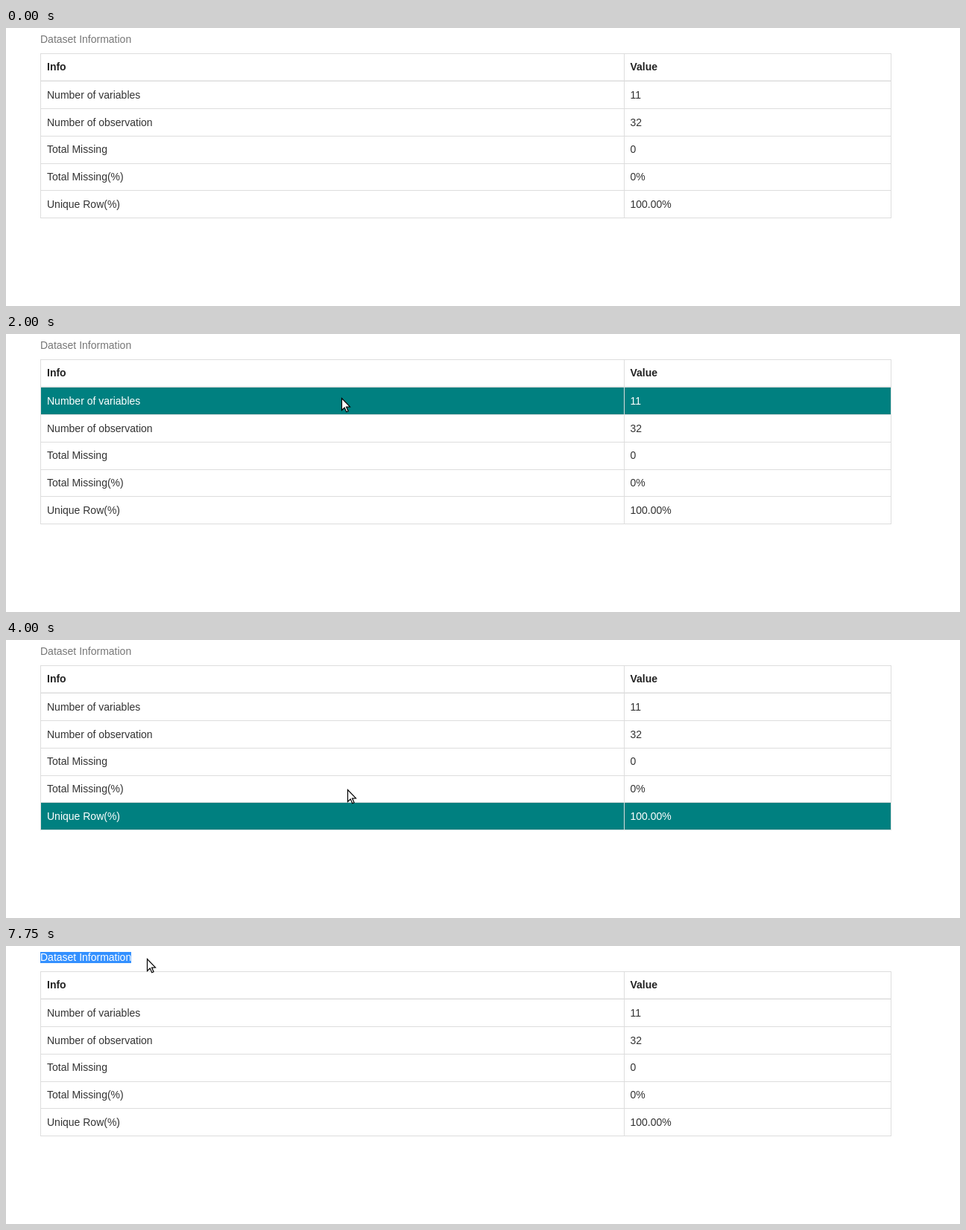
Recreate the animation shown at these times as an HTML page with a canvas. Size 1280 by 374 pixels, loop 8 s.

```html
<!DOCTYPE html>
<html lang="en">
<head>
<meta charset="utf-8">
<title>Dataset Information</title>
<style>
  html, body { margin: 0; width: 100%; height: 100%; overflow: hidden; background: #fff; }
  canvas { display: block; }
</style>
</head>
<body>
<canvas id="stage" width="1280" height="374"></canvas>
<script>
const ctx = document.getElementById('stage').getContext('2d');
const LOOP = 8000, STEP = 250;
const LEFT = 46, SPLIT = 829, RIGHT = 1187;
const LINES = [71, 108, 145, 182, 218, 255];
const BASELINES = [95, 132, 168, 205, 242];
const TITLE = 'Dataset Information';
const FONT = '14px "Liberation Sans", Arial, sans-serif';
const ROWS = [
  ['Number of variables', '11'],
  ['Number of observation', '32'],
  ['Total Missing', '0'],
  ['Total Missing(%)', '0%'],
  ['Unique Row(%)', '100.00%']
];

// One pose per step, starting at 750 ms: pointer x, y, hovered row (0 = none)
const START = 750;
const POSES = [
  [484, 272, 0], [478, 200, 4], [470, 122, 2], [458, 92, 1], [451, 82, 1],
  [450, 86, 1], [452, 97, 1], [455, 115, 2], [458, 132, 2], [460, 150, 3],
  [460, 180, 3], [460, 205, 4], [459, 228, 5], [458, 201, 5], [457, 135, 2],
  [457, 104, 1], [456, 89, 1], [440, 74, 1], [372, 50, 0], [284, 30, 0],
  [180, 24, 0], [80, 19, 0], [35, 14, 0], [105, 14, 0], [189, 15, 0],
  [196, 80, 1], [194, 222, 5], [191, 120, 2], [189, 17, 0]
];
const DRAG_START = 6500;

function rect(x, y, w, h, color) {
  ctx.fillStyle = color;
  ctx.fillRect(x, y, w, h);
}

function text(str, x, y, color, bold) {
  ctx.font = (bold ? 'bold ' : '') + FONT;
  ctx.fillStyle = color;
  ctx.fillText(str, x, y);
}

function drawTitle(selectTo) {
  text(TITLE, 46, 20, '#777');
  const right = Math.min(selectTo, 168);
  if (right <= LEFT) return;
  ctx.save();
  ctx.beginPath();
  ctx.rect(LEFT, 8, right - LEFT, 15);
  ctx.clip();
  rect(LEFT, 8, right - LEFT, 15, '#3390ff');
  text(TITLE, 46, 20, '#fff');
  ctx.restore();
}

function drawTable(hover) {
  const line = '#ddd';
  rect(LEFT, 34, RIGHT - LEFT + 1, 1, line);
  LINES.forEach((y, i) => rect(LEFT, i ? y : y - 0.5, RIGHT - LEFT + 1, i ? 1 : 1.5, line));
  if (hover) {
    const top = LINES[hover - 1] + 1;
    rect(LEFT + 1, top, RIGHT - LEFT - 1, LINES[hover] - top, '#008080');
  }
  for (const x of [LEFT, SPLIT, RIGHT]) rect(x, 34, 1, 222, line);

  text('Info', 55, 57, '#222', true);
  text('Value', 837.5, 57, '#222', true);
  ROWS.forEach(([label, value], i) => {
    const color = hover === i + 1 ? '#fff' : '#333';
    text(label, 55, BASELINES[i], color);
    text(value, 837.5, BASELINES[i], color);
  });
}

function drawPointer(x, y) {
  ctx.save();
  ctx.translate(x + 0.5, y + 0.5);
  ctx.beginPath();
  ctx.moveTo(0, 0);
  for (const [px, py] of [[0, 16], [3.7, 12.5], [6.3, 18.3], [8.6, 17.3], [6.1, 11.6], [11, 11.4]]) {
    ctx.lineTo(px, py);
  }
  ctx.closePath();
  ctx.fillStyle = '#fff';
  ctx.fill();
  ctx.lineWidth = 1.2;
  ctx.strokeStyle = '#000';
  ctx.stroke();
  ctx.restore();
}

function draw(time) {
  const t = time % LOOP;
  const pose = POSES[Math.floor((t - START) / STEP)];
  rect(0, 0, 1280, 374, '#fff');
  const selectTo = t < DRAG_START ? 0 : t < DRAG_START + STEP ? pose[0] : RIGHT;
  drawTitle(selectTo);
  drawTable(pose ? pose[2] : 0);
  if (pose) drawPointer(pose[0], pose[1]);
}

const begin = performance.now();
function tick() {
  draw(performance.now() - begin);
  requestAnimationFrame(tick);
}
tick();
</script>
</body>
</html>
```
